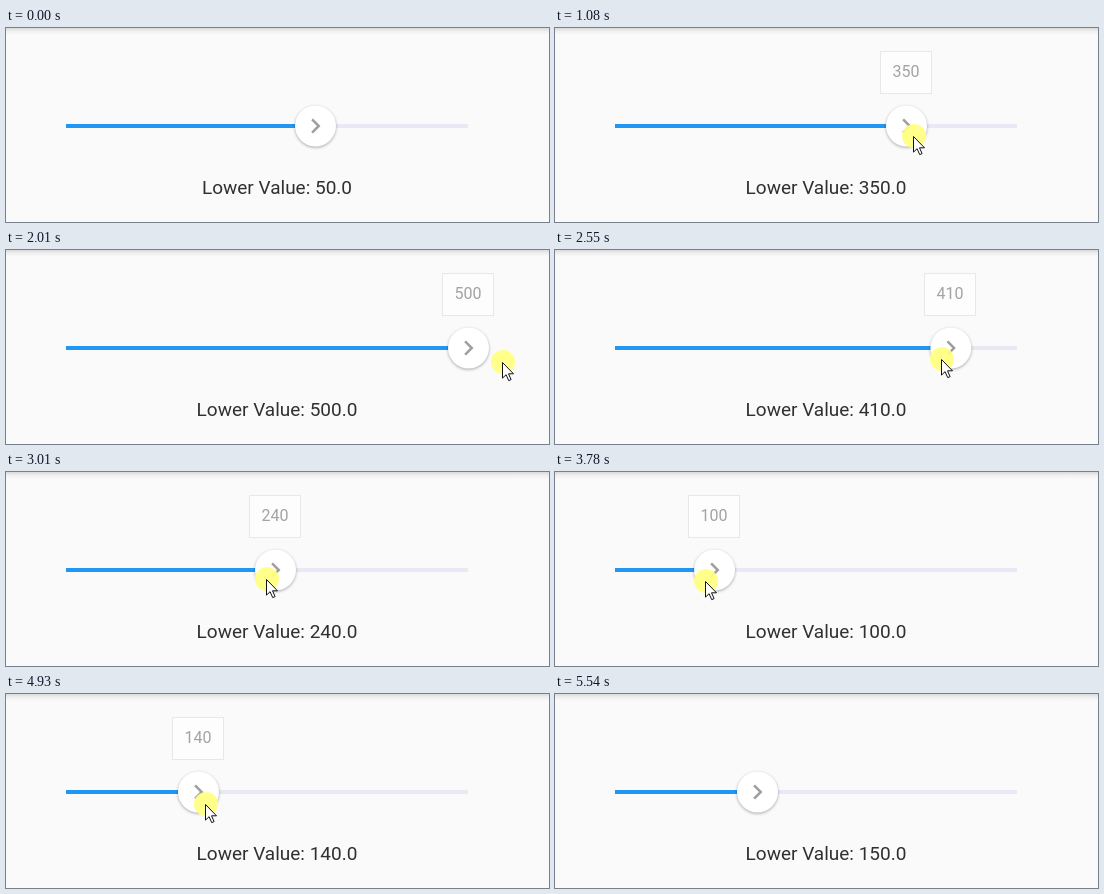
Animation of 543x194 px, one loop 6.25 s. Source, as an HTML page:

```html
<!DOCTYPE html>
<html lang="en">
<head>
<meta charset="utf-8">
<title>Slider</title>
<style>
  html, body { margin: 0; width: 100%; height: 100%; overflow: hidden; background: #fafafa; }
  svg { display: block; width: 543px; height: 194px; font-family: Roboto, sans-serif; }
  #knob circle { filter: drop-shadow(0 1px 1.5px rgba(0, 0, 0, .33)); }
</style>
</head>
<body>
<svg viewBox="0 0 543 194">
  <defs>
    <linearGradient id="shade" x2="0" y2="1">
      <stop offset="0" stop-color="#d9d9d9"/>
      <stop offset=".45" stop-color="#efefef"/>
      <stop offset="1" stop-color="#fafafa"/>
    </linearGradient>
  </defs>
  <rect width="543" height="194" fill="#fafafa"/>
  <rect width="543" height="7" fill="url(#shade)"/>
  <rect x="60" y="96" width="402" height="4" fill="#e9e8f4"/>
  <rect id="fill" x="60" y="96" height="4" fill="#2196f3"/>
  <g id="knob">
    <circle r="20.5" fill="#fff"/>
    <path transform="scale(1.25) translate(-12 -12)" fill="#9e9e9e"
      d="M10 6 8.59 7.41 13.17 12l-4.58 4.59L10 18l6-6z"/>
  </g>
  <g id="tip">
    <rect y="23.5" height="42" fill="#fdfdfd" stroke="#e8e8e8"/>
    <text y="49" font-size="16" text-anchor="middle" fill="#a3a3a3"></text>
  </g>
  <text id="caption" x="271" y="166" font-size="19" text-anchor="middle" fill="#303030"></text>
  <g id="pointer">
    <circle r="12" fill="#ffff80" opacity=".93"/>
    <path d="M-.5.5v15.6l3.6-3.4 2.6 5.9 2.4-1-2.6-5.8h5z" fill="#fff" stroke="#111"/>
  </g>
</svg>
<script>
const LOOP = 6250, FRAME = 76.9;
const MIN_X = 80.5, MAX_X = 462.5, MAX = 500, STEP = 10;
const ENTER = 70, PRESS = 590, TURN = 2090, TURN_BACK = 4460, RELEASE = 5100, LEAVE = 5530;

// Pointer stops: time, x, y
const stops = [
  [ENTER, 392, 188], [450, 317, 118], [PRESS, 317, 118], [1080, 359, 108], [1170, 361, 109],
  [2000, 497, 112], [TURN, 497, 112], [2780, 344, 108], [3000, 261, 106.5],
  [3460, 225, 108], [4090, 72, 110], [TURN_BACK, 34, 110],
  [5000, 210, 110], [RELEASE, 210, 110], [LEAVE, 325, 204]
];

const $ = id => document.getElementById(id);
const [fill, knob, tip, caption, pointer] = ['fill', 'knob', 'tip', 'caption', 'pointer'].map($);
const tipBox = tip.querySelector('rect'), tipText = tip.querySelector('text');

const clamp = (v, low, high) => Math.min(high, Math.max(low, v));
const smooth = u => u * u * (3 - 2 * u);
const show = (node, on) => node.setAttribute('visibility', on ? 'visible' : 'hidden');
const move = (node, x, y) => node.setAttribute('transform', `translate(${x} ${y})`);

function pointerAt(t) {
  t = clamp(t, ENTER, LEAVE);
  const next = Math.max(1, stops.findIndex(stop => stop[0] >= t));
  const [t0, x0, y0] = stops[next - 1], [t1, x1, y1] = stops[next];
  const u = smooth((t - t0) / (t1 - t0));
  return [x0 + (x1 - x0) * u, y0 + (y1 - y0) * u];
}

// The knob trails the pointer slightly in the direction of the drag
function knobAt(t) {
  t = clamp(t, PRESS, RELEASE);
  const lead = t > TURN && t < TURN_BACK ? -8.5 : 7.5;
  return clamp(pointerAt(t)[0] - lead, MIN_X, MAX_X);
}

function draw(time) {
  const t = Math.floor(time / FRAME) * FRAME;
  const x = knobAt(t);
  const level = Math.floor((x - MIN_X) / (MAX_X - MIN_X) * MAX / STEP) * STEP;
  const value = t < PRESS ? 50 : level;

  fill.setAttribute('width', x - 60);
  move(knob, x, 98);
  caption.textContent = `Lower Value: ${value.toFixed(1)}`;

  const width = 24 + 9 * String(value).length;
  tipBox.setAttribute('x', -width / 2);
  tipBox.setAttribute('width', width);
  tipText.textContent = value;
  move(tip, Math.floor(x), 0);
  show(tip, t >= PRESS && t < RELEASE);

  move(pointer, ...pointerAt(t).map(Math.round));
  show(pointer, t >= ENTER && t < LEAVE);
}

const begin = performance.now();
function tick() {
  draw((performance.now() - begin) % LOOP);
  requestAnimationFrame(tick);
}
tick();
</script>
</body>
</html>
```
